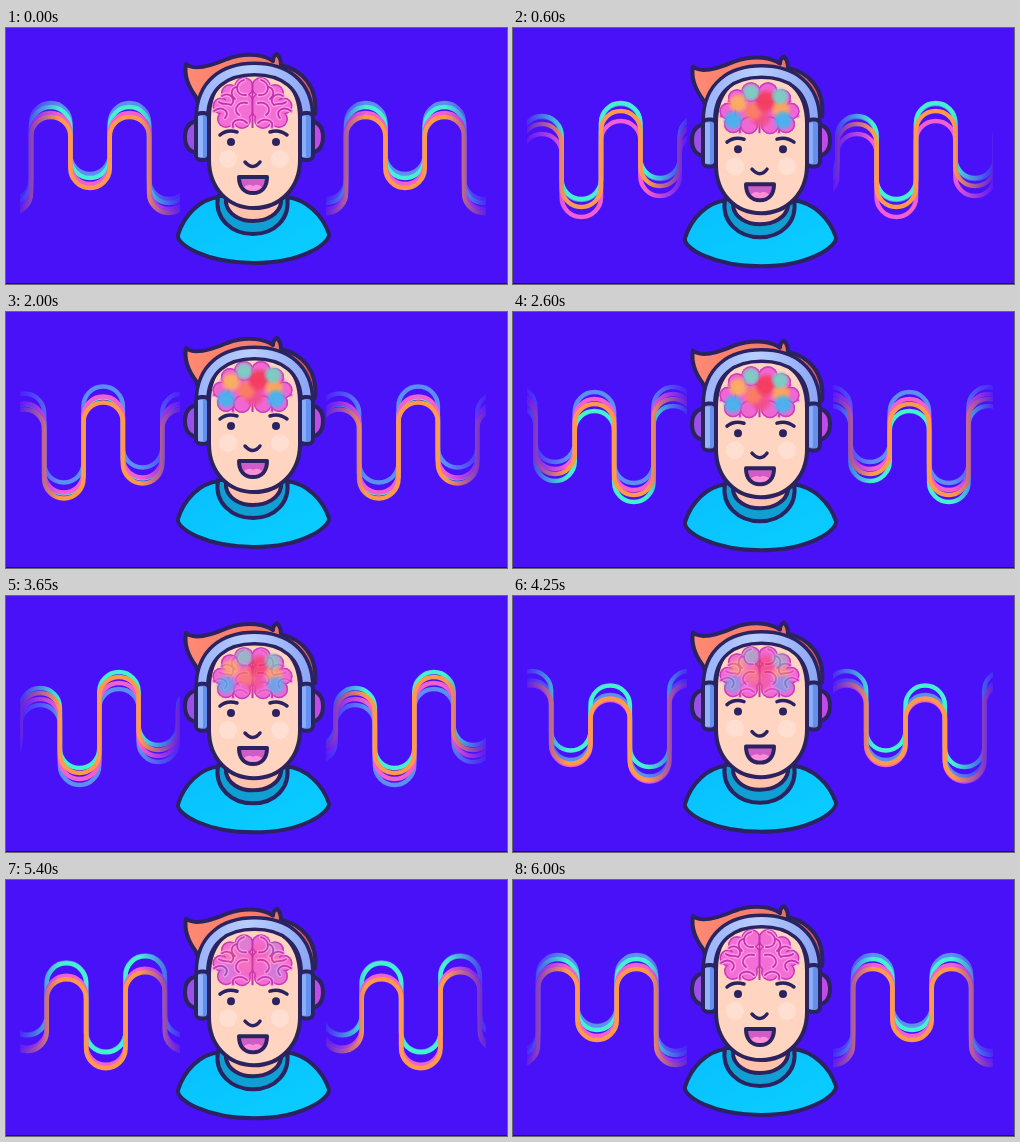
Animation, 501 px wide and 256 px high, one loop 6050 ms. Source, as an HTML page:

```html
<!DOCTYPE html>
<html lang="en">
<head>
<meta charset="utf-8">
<title>Listening mind</title>
<style>
  html, body { margin: 0; width: 100%; height: 100%; overflow: hidden; background: #4911f8; }
  svg { display: block; width: 501px; height: 256px; }
  .ink { stroke: #2a235f; stroke-width: 4; stroke-linecap: round; stroke-linejoin: round; }
  .line { fill: none; }
  .thin { stroke-width: 3.5; }
</style>
</head>
<body>
<svg viewBox="0 0 501 256">
  <defs>
    <linearGradient id="fade">
      <stop offset="0" stop-color="#fff" stop-opacity=".12"/>
      <stop offset=".25" stop-color="#fff"/>
      <stop offset=".75" stop-color="#fff"/>
      <stop offset="1" stop-color="#fff" stop-opacity=".12"/>
    </linearGradient>
    <linearGradient id="hairFill">
      <stop offset="0" stop-color="#ff8a72"/>
      <stop offset=".65" stop-color="#f47768"/>
      <stop offset="1" stop-color="#d9535f"/>
    </linearGradient>
    <linearGradient id="shirt" x2="1" y2="1">
      <stop offset="0" stop-color="#08bfff"/>
      <stop offset="1" stop-color="#0aceff"/>
    </linearGradient>
    <linearGradient id="bandFill">
      <stop offset="0" stop-color="#9db5fb"/>
      <stop offset=".45" stop-color="#b9ceff"/>
      <stop offset="1" stop-color="#8ea8f6"/>
    </linearGradient>
    <mask id="windows" maskUnits="userSpaceOnUse" x="0" y="0" width="501" height="256">
      <rect x="14" width="160" height="256" fill="url(#fade)"/>
      <rect x="320" width="160" height="256" fill="url(#fade)"/>
    </mask>
  </defs>

  <rect width="501" height="256" fill="#4911f8"/>
  <g id="waves" mask="url(#windows)" fill="none" stroke-width="4.5"></g>

  <g id="hair">
    <path class="ink" fill="url(#hairFill)" d="M180 36C188 43 205 38 221 31C243 23 260 28 267 33C267 29 269 27 271 26C274 29 275 33 275 37C296 42 312 58 309 86L196 86L190 69C181 57 178 47 180 36Z"/>
  </g>

  <g id="body">
    <path class="ink" fill="url(#shirt)" d="M172 207C178 187 194 171 213 169H280C301 171 317 188 323 206C324 215 297 235 248 235C199 235 170 216 172 207Z"/>
    <path class="ink" fill="#0f9fd2" d="M212 168C208 191 226 206 247 206S285 191 281 168Z"/>
    <path class="ink" fill="#ffc3ac" d="M220 164V175C222 186 233 193 247 193S273 186 275 175V164Z"/>
  </g>

  <g id="ears" class="ink">
    <path fill="#9a50e6" d="M192 93C183 94 179 100 179 109S183 124 192 125Z"/>
    <path fill="#c04be8" d="M304 93C313 94 317 100 317 109S313 124 304 125Z"/>
  </g>

  <g id="head">
    <path class="ink" fill="#ffd4c1" d="M203 90C203 56 224 41 248 41S294 56 294 90V132C294 160 274 180 248 180S203 160 203 132Z"/>
    <g id="brain" transform="translate(0 -2)"></g>
  </g>

  <g id="band" class="line">
    <path class="ink" style="stroke-width:15;stroke-linecap:butt" d="M196 104V90C196 56 219 41 248.5 41S301 56 301 90V104"/>
    <path stroke="url(#bandFill)" stroke-width="8" d="M196 104V90C196 56 219 41 248.5 41S301 56 301 90V104"/>
  </g>

  <g id="cups">
    <rect class="ink" x="190" y="85" width="13" height="47" rx="5" fill="#658fef"/>
    <path d="M192 88H197V129H192Z" fill="#95b5fb"/>
    <rect class="ink" x="294" y="85" width="13" height="47" rx="5" fill="#658fef"/>
    <path d="M296 88H300V129H296Z" fill="#8aadfa"/>
  </g>

  <g id="face">
    <circle cx="222" cy="131" r="9" fill="#ffdfd1"/>
    <circle cx="274" cy="131" r="9" fill="#ffdfd1"/>
    <path class="ink line thin" d="M214 107Q221 101 231 104M264 104Q273 101 281 107"/>
    <circle cx="225" cy="114" r="4" fill="#2a235f"/>
    <circle cx="270" cy="114" r="4" fill="#2a235f"/>
    <path class="ink line thin" d="M239 134Q247 143 254 134"/>
    <path class="ink" fill="#d05cc8" d="M233 149H261C261 159 256 165 247 165S233 159 233 149Z"/>
    <path d="M238 159Q243 155 247 158Q251 155 256 159Q253 163 247 163T238 159Z" fill="#ff8fd8"/>
  </g>
  <rect y="255" width="501" height="1" fill="#25097d"/>
</svg>

<script>
const $ = id => document.getElementById(id);
const NS = 'http://www.w3.org/2000/svg';
const add = (parent, tag, attrs) => {
  const el = document.createElementNS(NS, tag);
  for (const k in attrs) el.setAttribute(k, attrs[k]);
  return parent.appendChild(el);
};

// Brain: mirrored lobes and fold lines, covered by a layer of coloured spots
const brain = $('brain');
const lobes = [[233, 80, 16], [238, 61, 10], [224, 67, 9], [215, 80, 8.5], [220, 93, 9], [236, 94, 9]];
const folds = 'M238 54C228 57 229 70 240 69M216 70C224 65 231 74 225 79M208 85C216 79 225 86 219 92' +
  'M241 77C232 75 226 84 233 89M227 101C225 94 235 91 241 97M230 61C225 63 224 69 229 73M213 76C216 79 222 77 225 79';
const halves = ['', 'matrix(-1 0 0 1 493 0)'];
const addLobes = (parent, grow, style) => {
  for (const transform of halves)
    for (const [cx, cy, r] of lobes) add(parent, 'circle', { cx, cy, r: r + grow, transform, ...style });
};

addLobes(brain, 0, { fill: '#c936b4' });
addLobes(brain, -1.5, { fill: '#f36ed5' });
for (const transform of halves)
  for (const [stroke, width] of [['#ff9be6', 4.5], ['#c232ac', 1.8]])
    add(brain, 'path', { d: folds, fill: 'none', stroke, 'stroke-width': width, 'stroke-linecap': 'round', transform });
add(brain, 'path', { d: 'M246.5 56V102', stroke: '#c232ac', 'stroke-width': 2 });

const glow = add(brain, 'g', {});
addLobes(glow, -.7, { fill: '#f067d2', stroke: '#cb3fbd', 'stroke-width': 1.4 });
const spots = [[248, 86, 12, '#f2508c'], [240, 80, 11, '#fb7d62'], [253, 70, 13, '#f53c5c'], [225, 72, 11, '#fbb060'],
  [268, 78, 11, '#fba85c'], [238, 61, 10, '#78d0c2'], [267, 65, 10, '#78d0c2'], [220, 89, 11, '#45b4f0'], [270, 89, 11, '#45b4f0']];
spots.forEach(([cx, cy, r, color], i) => {
  const g = add(glow, 'radialGradient', { id: 'spot' + i });
  [[0, 1], [.55, .9], [1, 0]].forEach(([offset, a]) =>
    add(g, 'stop', { offset, 'stop-color': color, 'stop-opacity': a }));
  add(glow, 'circle', { cx, cy, r, fill: `url(#spot${i})` });
});

// Key values over time
const times = [0, 600, 1400, 2600, 3650, 4850, 6000];
const at = (keys, t) => {
  let i = 0;
  while (i < times.length - 2 && t >= times[i + 1]) i++;
  const p = Math.min(1, (t - times[i]) / (times[i + 1] - times[i]));
  return keys[i] + (keys[i + 1] - keys[i]) * (1 - Math.cos(Math.PI * p)) / 2;
};
const crest = [84, 97, 93, 89, 100, 97, 84];
const trough = [155, 159, 171, 159, 157, 170, 155];
const glowing = [0, 1, 1, 1, .75, .3, 0];
const strands = [
  ['#5b8ff2', [-9, -8, -10, -9, 9, -8, -9]],
  ['#46f0d2', [-5, -9, -7, 10, -8, -10, -5]],
  ['#f25fd0', [1, 9, 3, -2, 3, 8, 1]],
  ['#ff9a4c', [5, -1, 10, 3, -3, 11, 5]]
].map(([stroke, keys]) => ({ keys, path: add($('waves'), 'path', { stroke }) }));

const PERIOD = 157.5, STEP = PERIOD / 4, R = STEP / 2;
const wave = (dy, t) => {
  const arc = (y, up) => `V${y + dy + (up ? R : -R)}a${R} ${R} 0 0 ${up} ${STEP} 0`;
  const cycle = arc(84, 1) + arc(at(trough, t), 0) + arc(at(crest, t), 1) + arc(180, 0);
  return `M${25 + 4 * PERIOD * t / 6000 % PERIOD - 2 * PERIOD} ${130 + dy}` + cycle.repeat(6);
};

const nodding = { hair: 4, body: 5, ears: 5, head: 8, band: 4, cups: 10, face: 11 };

function draw() {
  const t = Math.floor(performance.now() % 6050 / 50) * 50;
  const nod = (1 - Math.cos(Math.PI * t / 1000)) / 2;
  for (const id in nodding) $(id).setAttribute('transform', `translate(0 ${nodding[id] * nod})`);
  for (const s of strands) s.path.setAttribute('d', wave(at(s.keys, t), t));
  glow.setAttribute('opacity', at(glowing, t));
  requestAnimationFrame(draw);
}
draw();
</script>
</body>
</html>
```
